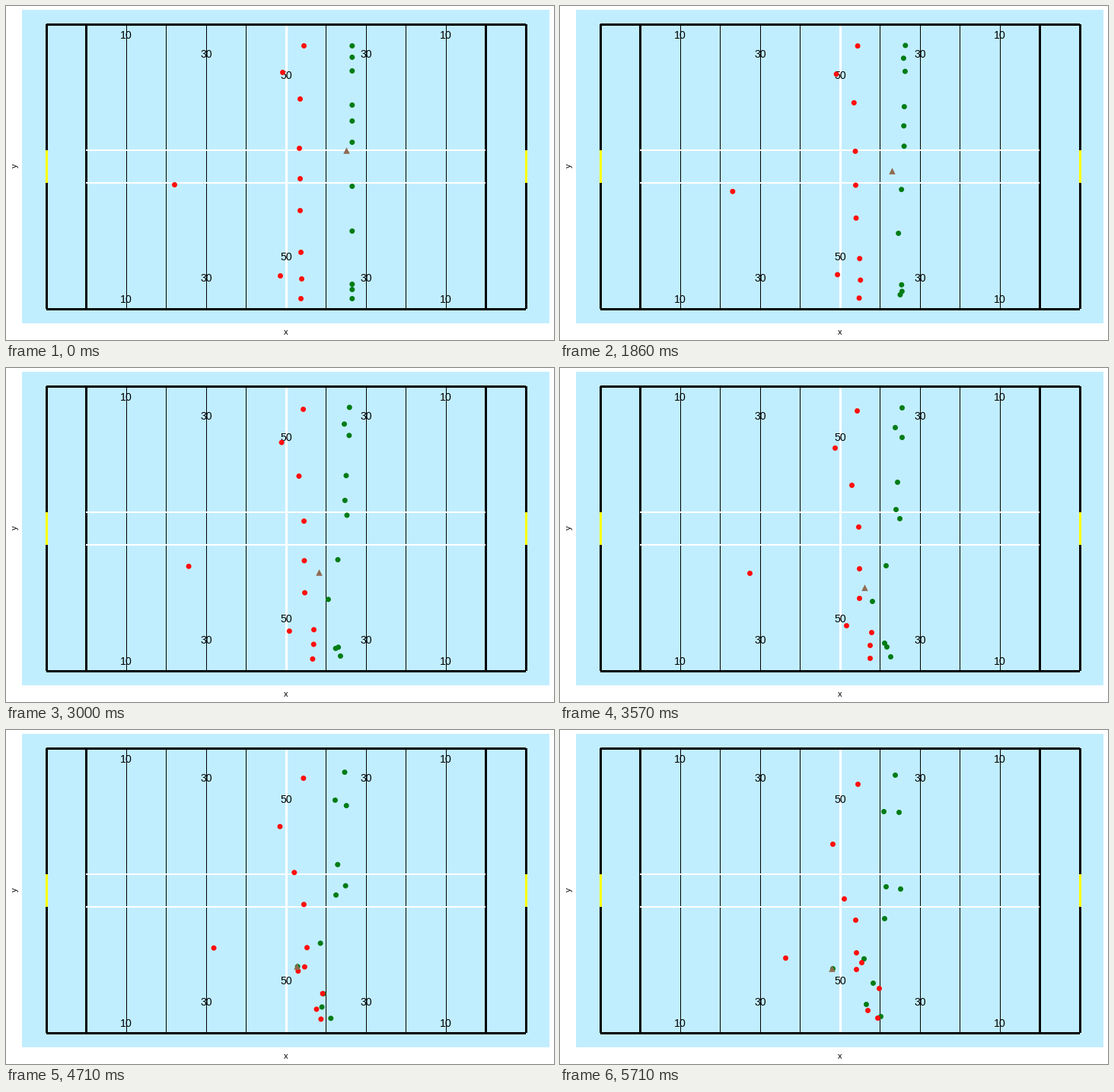
Animation of 720 by 440 pixels, one loop 5860 ms. Source, as a matplotlib script:

```python
import numpy as np
import matplotlib.pyplot as plt
from matplotlib.animation import FuncAnimation
from matplotlib.patches import Rectangle

W, H, DPI = 720, 440, 80
PX = 72 / DPI                      # points per pixel
FRAMES, INTERVAL = 293, 20
RATE = 7                           # position updates per second

GREEN, RED, BROWN = "#007c16", "#ff0d0d", "#8f6a50"

# Each run starts from rest, passes a midway point and ends at full speed.
START, MID, END = 4, 25, 40
KICK, PICKUP, CARRIER = 9.5, 33, 7
KICK_LINE = 454.3
TEE = np.array([447, 190])

# Kickers line up together: start y, midway x y, final x y.
KICKERS = [
    (52, 449, 52, 440, 59),
    (67, 440, 78, 425, 107),
    (85, 449, 91, 445, 108),
    (130, 443, 150, 428, 206),
    (151, 441, 186, 426, 248),
    (179, 446, 198, 447, 209),
    (237, 428, 260, 399, 301),
    (296, 410, 307, 358, 314),
    (366, 429, 367, 402, 361),
    (373, 434, 380, 421, 377),
    (385, 426, 362, 411, 333),
]
# Returners: start x y, midway x y, final x y.
RETURNERS = [
    (391, 52, 390, 56, 391, 71),
    (363, 87, 361, 105, 358, 150),
    (386, 122, 383, 154, 373, 222),
    (385, 187, 392, 209, 388, 250),
    (386, 227, 393, 264, 396, 306),
    (221, 235, 249, 270, 296, 300),
    (386, 269, 393, 303, 389, 315),
    (387, 324, 409, 348, 419, 340),
    (360, 355, 376, 339, 389, 293),
    (388, 359, 407, 365, 404, 369),
    (387, 385, 407, 382, 417, 379),
]
runs = [(KICK_LINE, *row) for row in KICKERS] + RETURNERS
P0, P1, P2 = np.array(runs).reshape(-1, 3, 2).swapaxes(0, 1) + 0.5
COLORS = [GREEN] * len(KICKERS) + [RED] * len(RETURNERS)

# Spline velocities: smooth at the midway point, no acceleration at the end.
A, B = MID - START, END - MID
S1, S2 = (P1 - P0) / A, (P2 - P1) / B
V1 = (6 * S1 / A + 3 * S2 / B) / (4 / A + 3 / B)
V2 = (3 * S2 - V1) / 2


def hermite(p, q, v, w, h, u):
    blend = u * u * (3 - 2 * u)
    return p + (q - p) * blend + h * u * (1 - u) * ((1 - u) * v - u * w)


def players_at(step):
    if step < MID:
        return hermite(P0, P1, 0, V1, A, max(step - START, 0) / A)
    return hermite(P1, P2, V1, V2, B, (step - MID) / B)


def ball_at(step):
    """Rolls from the tee, slowing down, then travels with its carrier."""
    held = players_at(max(step, PICKUP))[CARRIER] - (1.5, 1)
    p = np.clip((step - KICK) / (PICKUP - KICK), 0, 1)
    return TEE + (held - TEE) * (1 - (1 - p) ** np.array([1.2, 1.6]))


fig = plt.figure(figsize=(W / DPI, H / DPI), dpi=DPI, facecolor="white")
ax = fig.add_axes([0, 0, 1, 1])
ax.set(xlim=(0, W), ylim=(H, 0))
ax.axis("off")


def box(x0, y0, x1, y1, color):
    ax.add_patch(Rectangle((x0, y0), x1 - x0, y1 - y0,
                           facecolor=color, linewidth=0, antialiased=False))


def label(x, y, text, size, **kw):
    ax.text(x, y, text, fontsize=size * PX, family="Liberation Sans",
            color="black", ha="center", va="baseline", **kw)


def yard_x(yards):
    return int(105.5 + 5.25 * yards)


def draw_field():
    box(21, 5, 714, 418, "#c1eeff")
    for yards in range(10, 100, 10):
        x = yard_x(yards)
        if yards == 50:
            box(x - 1, 24, x + 2, 399, "white")
        else:
            box(x, 24, x + 1, 399, "black")
    for yards in (-10, 0, 100, 110):
        x = yard_x(yards)
        box(x - 1, 24, x + 2, 399, "black")
    for y in (24, 399):
        box(53, y - 1, 683, y + 2, "black")
    for y in (189, 232):
        box(105, y, 630, y + 2, "white")
    for x in (52, 682):
        box(x, 190, x + 3, 233, "yellow")

    for number, top, bottom in ((10, 38, 386), (30, 63, 358), (50, 91, 330)):
        for x in {yard_x(number), yard_x(100 - number)}:
            for y in (top, bottom):
                label(x, y + 5, str(number), 14.2)
    label(368, 433, "x", 11)
    label(15, 210, "y", 11, rotation=90, rotation_mode="anchor")


draw_field()
dots = ax.scatter(*players_at(0).T, s=(7 * PX) ** 2, c=COLORS,
                  linewidths=0, zorder=4)
ball = ax.scatter(*ball_at(0), s=(8.5 * PX) ** 2, c=BROWN, marker="^",
                  linewidths=0, zorder=5)


def update(i):
    # A small lead lands each update on the 20 ms grid.
    step = (i * INTERVAL + 15) * RATE // 1000
    dots.set_offsets(players_at(step))
    ball.set_offsets([ball_at(step)])
    return dots, ball


anim = FuncAnimation(fig, update, frames=FRAMES, interval=INTERVAL,
                     repeat=True, repeat_delay=0, blit=False)
plt.show()
```
